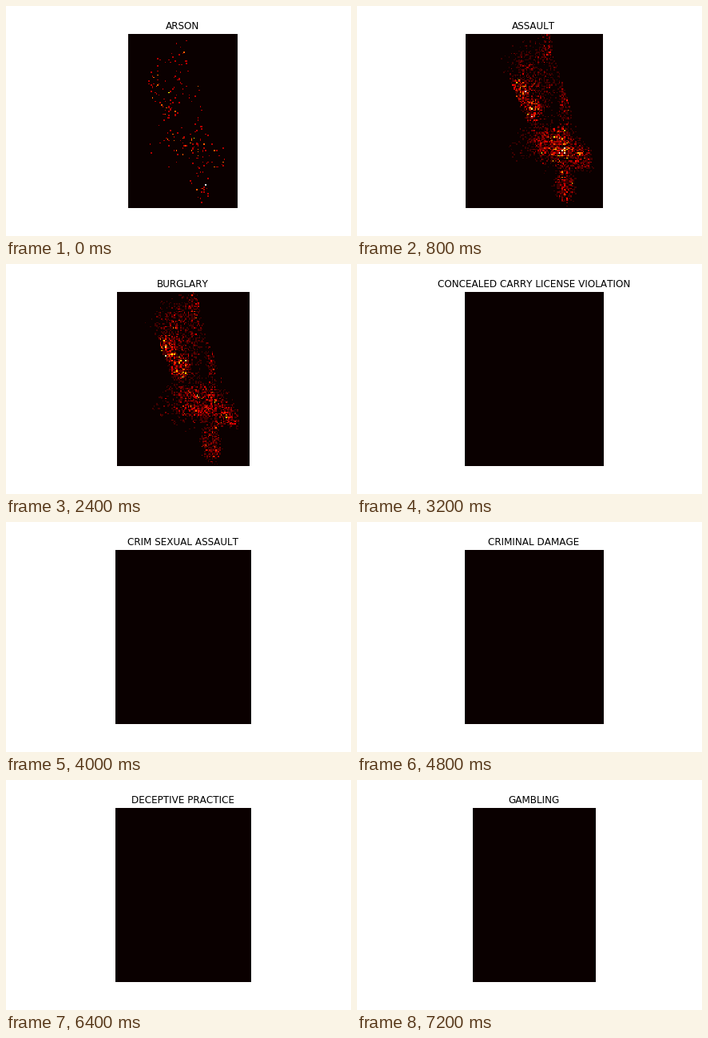
A matplotlib script that plays this animation: 432 px wide and 288 px high, repeating every 8000 ms.

```python
import numpy as np
import matplotlib.pyplot as plt
from matplotlib.animation import FuncAnimation

plt.rcParams["text.kerning_factor"] = 6

W, H, DPI = 432, 288, 72
TOP, BOTTOM, MID = 35, 253, 222
CENTRE = 0.125 + 0.775 / 2          # middle of the default plot area
ROWS, COLS = 138, 110
CELL = (BOTTOM - TOP) / ROWS

# Title and map width in pixels; narrower maps are trimmed in the west
SLIDES = [
    ("ARSON", 137),
    ("ASSAULT", 172),
    ("BATTERY", 168),
    ("BURGLARY", 166),
    ("CONCEALED CARRY LICENSE VIOLATION", 174),
    ("CRIM SEXUAL ASSAULT", 170),
    ("CRIMINAL DAMAGE", 174),
    ("CRIMINAL TRESPASS", 168),
    ("DECEPTIVE PRACTICE", 170),
    ("GAMBLING", 154),
]

# Busy districts: centre x, y, radius x, y, weight
DISTRICTS = [
    (205, 106, 11, 16, 2.6),
    (222, 130, 11, 14, 2.6),
    (248, 174, 24, 20, 2.0),
    (270, 188, 18, 16, 1.0),
    (287, 192, 11, 13, 1.5),
    (261, 224, 11, 24, 1.4),
    (261, 122, 6, 38, 1.0),
    (240, 48, 9, 20, 0.8),
    (222, 92, 30, 42, 0.6),
    (235, 168, 45, 30, 0.25),
]


def city_rate():
    """Flat-topped districts, cut off at the western border and the shore."""
    x, y = np.meshgrid(MID - 87 + (np.arange(COLS) + 0.5) * CELL,
                       TOP + (np.arange(ROWS) + 0.5) * CELL)
    rate = sum(w * np.exp(-(((x - cx) / rx) ** 2 + ((y - cy) / ry) ** 2) ** 2)
               for cx, cy, rx, ry, w in DISTRICTS)
    levels = [35, 60, 90, 145, 180, 252]
    west = np.interp(y, levels, [232, 160, 192, 212, 186, 262])
    east = np.interp(y, levels, [244, 247, 256, 274, 294, 304])
    return rate * (x > west) * (x < east)


def heat(seed, gain, focus, clump, top):
    """Uneven random counts, scaled so that `top` incidents are white."""
    rng = np.random.default_rng(seed)
    streets = rng.uniform(0.65, 1.35, (ROWS, 1)) * rng.uniform(0.65, 1.35, COLS)
    rate = gain * RATE ** focus * streets
    return rng.poisson(rate * rng.gamma(clump, 1 / clump, rate.shape)) / top


RATE = city_rate()
EMPTY = np.zeros((ROWS, COLS))
MAPS = {
    "ARSON": heat(3, gain=0.05, focus=1, clump=0.3, top=4),
    "ASSAULT": heat(5, gain=1, focus=1, clump=1.8, top=13),
    "BATTERY": heat(8, gain=0.6, focus=1.4, clump=1, top=13),
    "BURGLARY": heat(11, gain=0.9, focus=0.8, clump=1.6, top=12),
}

fig = plt.figure(figsize=(W / DPI, H / DPI), dpi=DPI, facecolor="white")
ax = fig.add_axes([0, 0, 1, 1])
title = fig.text(CENTRE, 0.88 + 6 / H, "", fontsize=12, ha="center",
                 va="baseline", fontfamily="DejaVu Sans")


def draw(i):
    name, width = SLIDES[i]
    left = MID - (width + 1) // 2
    cols = round(width / CELL)
    ax.clear()
    ax.axis("off")
    ax.set_position([left / W, 1 - BOTTOM / H, width / W, (BOTTOM - TOP) / H])
    ax.imshow(MAPS.get(name, EMPTY)[:, COLS - cols:], cmap="hot", vmin=0,
              vmax=1, interpolation="nearest", aspect="auto")
    title.set_text(name)
    return ax, title


anim = FuncAnimation(fig, draw, frames=len(SLIDES), init_func=lambda: [],
                     interval=800, repeat=True, repeat_delay=0)
plt.show()
```
